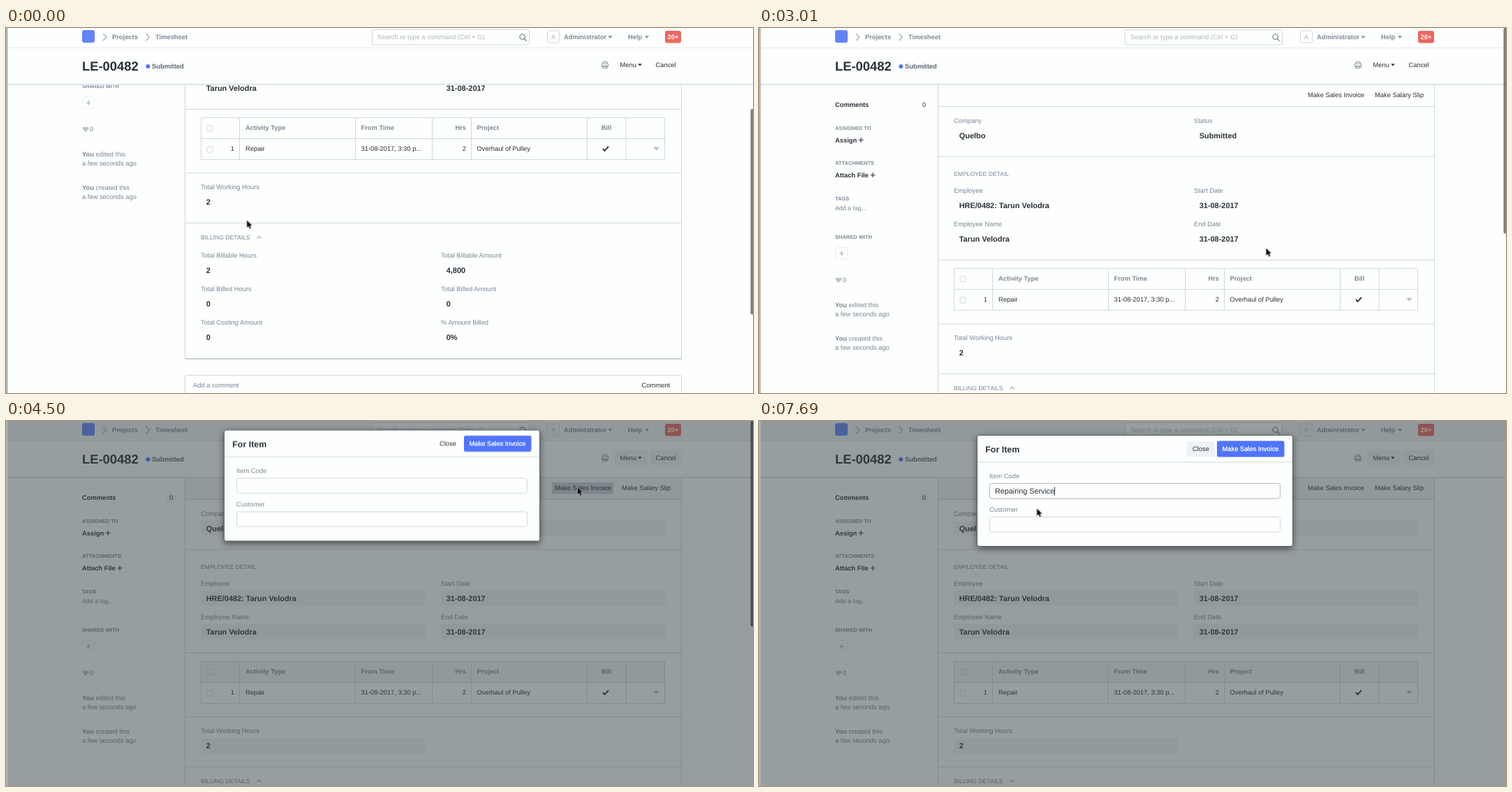
Animation, 1070 px wide and 523 px high, one loop 7990 ms. Source, as an HTML page:

```html
<!DOCTYPE html>
<html lang="en">
<head>
<meta charset="utf-8">
<title>Timesheet to invoice</title>
<style>
html, body { margin: 0; width: 100%; height: 100%; overflow: hidden; background: #fdfefe; }
svg { display: block; width: 1070px; height: 523px; }
text { font: 9.35px "Liberation Sans", Arial, sans-serif; fill: #2b3038; text-rendering: geometricPrecision; white-space: pre; }
.b { font-weight: 700; }
.g { fill: #7b8692; }
.nav { font-weight: 700; fill: #7f8994; }
.pale { fill: #b0b6bd; }
.val { font-size: 10.95px; font-weight: 700; }
.cap { font-size: 8.6px; fill: #7b8692; }
.side { font-size: 7.5px; font-weight: 700; fill: #7f8994; }
.tag { font-size: 8.8px; fill: #7b8692; }
.id { font-size: 18.4px; font-weight: 700; }
.head { font-size: 12.4px; font-weight: 700; }
.typed { font-size: 10.8px; }
.sub { font-size: 7.95px; }
.w { fill: #fff; }
.strong { stroke: #fff; stroke-width: .3; }
.end { text-anchor: end; }
.mid { text-anchor: middle; }
.paper { fill: #fdfefe; }
.fill { fill: #f2f4f8; }
.patch { fill: #f5f5fa; }
.line { fill: none; stroke: #d1d8dd; }
.dash { fill: none; stroke: #dfe4e8; stroke-dasharray: 2 1.5; }
.ink { fill: none; stroke: #2b3038; stroke-width: 1.1; }
.soft { fill: none; stroke: #a0a9b2; stroke-width: 1.1; }
.field { fill: #fdfefe; stroke: #d1d8dd; }
.drop { fill: #fdfefe; filter: drop-shadow(0 2px 3px rgba(0,0,0,.35)); }
.box { fill: #fdfefe; stroke: #5d6568; filter: drop-shadow(0 3px 5px rgba(0,0,0,.5)); }
</style>
</head>
<body>
<script>
const LOOP = 7990;
let css = '', count = 0;

const T = (x, y, s, c = '') => `<text x="${x}" y="${y}" class="${c}">${s}</text>`;
const R = (x, y, w, h, c, r = 0, extra = '') =>
  `<rect x="${x}" y="${y}" width="${w}" height="${h}" rx="${r}" class="${c}" ${extra}/>`;
const P = (d, c, extra = '') => `<path d="${d}" class="${c}" ${extra}/>`;
const G = (id, ...kids) => `<g id="${id}">${kids.join('')}</g>`;
const caret = (x, y, color, w = 3.3) => P(`M${x - w} ${y - 1.8}h${2 * w}l${-w} ${w + .4}z`, '', `fill="${color}"`);
const plus = (x, y, s, c) => P(`M${x - s} ${y}h${2 * s}M${x} ${y - s}v${2 * s}`, c);
const field = (x, y, label, value) =>
  R(x, y + 7.5, 321.5, 21.5, 'fill', 2) + T(x, y, label, 'g') + T(x + 7.7, y + 22.2, value, 'val');

// stops: [ms, declarations]
function anim(sel, ease, stops) {
  const name = 'k' + count++;
  const body = stops.map(([ms, d]) => `${(ms / LOOP * 100).toFixed(3)}%{${d}}`).join('');
  css += `@keyframes ${name}{${body}}${sel}{animation:${name} ${LOOP}ms ${ease} infinite}`;
}
function show(sel, from, to = LOOP) {
  const stops = [[0, `opacity:${from > 0 ? 0 : 1}`], [to, `opacity:${to < LOOP ? 0 : 1}`]];
  if (from > 0) stops.splice(1, 0, [from, 'opacity:1']);
  anim(sel, 'step-end', stops);
}
const at = (x, y) => `transform:translate(${x}px,${y}px)`;
const smooth = ';animation-timing-function:ease-in-out';

const sidebar =
  R(229, 102, 15, 16, 'fill', 8) + T(109, 113.3, 'Comments', 'b') + T(234, 113.3, '0') +
  T(109, 146, 'ASSIGNED TO', 'side') + T(109, 163.7, 'Assign', 'b') + plus(146, 160.5, 3.5, 'ink') +
  T(109, 196.4, 'ATTACHMENTS', 'side') + T(109, 213.9, 'Attach File', 'b') + plus(163, 210.8, 3.5, 'ink') +
  T(109, 246.7, 'TAGS', 'side') + T(109, 261.3, 'Add a tag...', 'tag') +
  T(109, 302.4, 'SHARED WITH', 'side') + R(109.5, 314.5, 17, 17, 'dash', 2) + plus(118.2, 323, 3.4, 'soft') +
  P('M114 365.3l-4-4.2c-1.6-3.4 2.6-5 4-2 1.4-3 5.6-1.4 4 2z', '', 'fill="#bfc4c9"') + T(120, 364.4, '0', 'g') +
  ['edited', 'created'].map((verb, i) =>
    T(109, 399.7 + 48 * i, `<tspan font-weight="700">You</tspan> ${verb} this`, 'g') +
    T(109, 412.6 + 48 * i, 'a few seconds ago', 'g')).join('');

const table =
  R(279.5, 344.5, 664, 30, 'fill') +
  P('M279.5 344.5h664v60h-664zM279.5 374.5h664' +
    [334.5, 500.5, 610.5, 666.5, 832.5, 888].map(x => `M${x} 344.5v60`).join(''), 'line') +
  [355.5, 386].map(y => R(288, y, 8, 8, 'line', 1)).join('') +
  T(343, 362.3, 'Activity Type', 'nav') + T(508.5, 362.3, 'From Time', 'nav') +
  T(659, 362.3, 'Hrs', 'nav end') + T(674.5, 362.3, 'Project', 'nav') + T(860, 362.3, 'Bill', 'nav mid') +
  T(327, 392.3, '1', 'end') + T(343, 392.3, 'Repair') + T(508.5, 392.3, '31-08-2017, 3:30 p...') +
  T(659, 392.3, '2', 'end') + T(674.5, 392.3, 'Overhaul of Pulley') +
  P('M855 389l2.6 2.8 5.4-6', 'ink', 'style="stroke-width:1.9"') + caret(931.5, 388.6, '#b8bfc5', 4.4);

const form =
  R(257, 81, 710, 31.5, 'fill') +
  R(781.5, 88, 88.5, 16.5, '', 2.5, 'id="hover" fill="#c6ccd3"') +
  T(786, 99.4, 'Make Sales Invoice') + T(882, 99.4, 'Make Salary Slip') +
  field(279, 135.5, 'Company', 'Quelbo') + field(623, 135.5, 'Status', 'Submitted') +
  T(279, 211.7, 'EMPLOYEE DETAIL', 'cap') +
  field(279, 235.6, 'Employee', 'HRE/0482: Tarun Velodra') + field(623, 235.6, 'Start Date', '31-08-2017') +
  field(279, 283.6, 'Employee Name', 'Tarun Velodra') + field(623, 283.6, 'End Date', '31-08-2017') +
  table +
  field(279, 447.2, 'Total Working Hours', '2') +
  T(279, 518.8, 'BILLING DETAILS', 'cap') + P('M359.5 517.5l3.2-3.2 3.2 3.2', 'soft') +
  field(279, 544.8, 'Total Billable Hours', '2') + field(623, 544.8, 'Total Billable Amount', '4,800') +
  field(279, 592.9, 'Total Billed Hours', '0') + field(623, 592.9, 'Total Billed Amount', '0') +
  field(279, 641, 'Total Costing Amount', '0') + field(623, 641, '% Amount Billed', '0%') +
  P('M256.5 70V690M967.5 70V690' + [112.5, 184, 332.5, 424, 495.5].map(y => `M256.5 ${y}h711`).join(''), 'line') +
  P('M256.5 690h711', 'line', 'style="stroke:#b9c0c8;stroke-width:1.4"') +
  R(256.5, 713.5, 711, 60, 'line', 2) + T(268, 730.8, 'Add a comment', 'g') + T(951, 730.8, 'Comment', 'end');

const patches =
  R(279, 552, 70, 21.5, 'patch', 0, 'id="p1"') +
  G('p2', R(349, 558, 133, 15.5, 'patch'), R(482, 552, 119, 21.5, 'patch')) +
  R(623, 552, 42, 19.5, 'patch', 0, 'id="p3"');

const header =
  R(0, -5, 1070, 85.5, 'paper') + R(0, -5, 1070, 33, 'fill') +
  P('M0 28.5h1070', 'line', 'style="stroke:#e6eaed"') + P('M0 80.5h1070', 'line') +
  P('M0 81.5h1070', 'line', 'style="stroke:#eceff1"') +
  R(109, 3, 18, 18, '', 3, 'fill="#6383fb"') +
  [139, 200.5].map(x => P(`M${x} 8l5 5-5 5`, 'soft')).join('') +
  T(152, 16.4, 'Projects', 'nav') + T(214, 16.4, 'Timesheet', 'nav') +
  R(524.5, 2.5, 225, 21.5, 'field', 2.5) + T(532, 16.4, 'Search or type a command (Ctrl + G)', 'pale') +
  P('M736 12.5a3.7 3.7 0 1 1 7.4 0a3.7 3.7 0 1 1-7.4 0M742.4 15.3l3.2 3.2', 'ink', 'style="stroke:#66707a"') +
  R(775.5, 4, 17, 17, 'line', 2) + T(784, 16.4, 'A', 'pale mid') +
  T(799, 16.2, 'Administrator', 'nav') + caret(865.5, 13, '#8d99a6') +
  T(891, 16.2, 'Help', 'nav') + caret(918, 13, '#8d99a6') +
  R(944, 4, 23, 17.5, '', 3, 'fill="#ee6660"') + T(955.5, 16.2, '20+', 'w b mid') +
  T(109, 61, 'LE-00482', 'id') + '<circle cx="203.3" cy="55" r="3" fill="#4f74ff"/>' +
  T(209, 58.3, 'Submitted', 'b" style="fill:#5d6670') +
  P('M855 51v-2.5h6V51M853.5 51h9v4.5h-9zM855 54h6v3.5h-6z', 'ink', 'style="stroke:#848d96;stroke-width:.9"') +
  R(871.5, 42, 47.5, 21.5, 'fill', 2.5) + T(879.5, 56, 'Menu') + caret(908, 53, '#2b3038', 2.8) +
  R(922.5, 42, 45, 21.5, 'fill', 2.5) + T(930.5, 56, 'Cancel');

const row = (i, name, sub) => T(339.3, 131 + 36.1 * i, name, 'b') + T(339.3, 140 + 36.1 * i, sub, 'sub');

const lists =
  G('all', R(330, 113, 417, 151, 'drop', 2), R(330.5, 114, 416, 36, '', 0, 'fill="#eff2f5"'),
    row(0, 'Gelk-prime-rd4170', 'Gelk Prime R, Gelk R, Products'),
    row(1, 'Test Item Serial No', 'Products'),
    row(2, 'Norvi Tablet 5 (Ash Grey, 256GB)', 'Tablet 5, Products'),
    row(3, 'Phone Charger', 'Products')) +
  G('match', R(330, 113, 417, 94, 'drop', 2), R(330.5, 114, 416, 36, '', 0, 'fill="#eff2f5"'),
    row(0, 'Repairing Service', 'Services'),
    T(339.3, 168, 'Create a new Item'), T(339.3, 195, 'Advanced Search'));

const modal =
  R(312.5, 20.5, 452, 159, 'box', 3) + P('M313 59h451', 'line') +
  T(324.3, 45, 'For Item', 'head') +
  R(613, 29, 40, 22, '', 2.5, 'id="close" fill="#eff2f5"') + T(633, 43, 'Close', 'mid') +
  R(656, 28.5, 96.5, 23, '', 2.5, 'fill="#5074fd"') + T(704, 43, 'Make Sales Invoice', 'w mid strong') +
  T(330, 82.2, 'Item Code', 'g') + R(330.5, 89.5, 416, 21.5, 'field', 3) +
  R(330.5, 89.5, 416, 21.5, 'field', 3, 'id="focus" style="stroke:#b8bbbe"') +
  T(330, 130.2, 'Customer', 'g') + R(330.5, 137.5, 416, 21.5, 'field', 3) +
  ['r', 're', 'rep'].map((s, i) => G('t' + i, T(338, 104.4, s, 'typed'))).join('') +
  G('done', T(338, 104.4, 'Repairing Service', 'typed'), P('M423.5 94.5v12', 'ink', 'style="stroke-width:1"')) +
  lists;

const arrow = P('M0 0V12.2L2.8 9.6 4.7 14 6.9 13 5 8.8H8.8Z', '',
  'transform="scale(.86)" fill="#111" stroke="#fff" stroke-width="1" paint-order="stroke"');

// Page scroll, then the overscroll settling back
const scroll = (sel, y) => anim(sel, 'linear', [
  [0, at(0, y)], [2410, at(0, y) + smooth], [3010, at(0, 0)], [7989, at(0, 0)], [LOOP, at(0, y)]]);
scroll('#page', -216);
scroll('#thumb', 116);
anim('#view', 'linear', [
  [0, at(0, 0)], [3010, at(0, 0)], [3160, at(0, 4)], [3340, at(0, 2.3)],
  [3580, at(0, 2.3)], [3730, at(0, 0)], [LOOP, at(0, 0)]]);

anim('#cursor', 'linear', [
  [0, at(345, 275.5)], [150, at(345, 275.5)], [450, at(312, 312)], [750, at(270, 356)],
  [1070, at(285, 350)], [1220, at(285, 350)], [1520, at(440, 334)], [1820, at(653, 347)],
  [1960, at(653, 347)], [2260, at(619, 339.5)], [2410, at(619, 339.5)], [3160, at(753, 309.5)],
  [3580, at(753, 309.5) + smooth], [4060, at(818.6, 95)],
  [5030, at(818.6, 95) + smooth], [5550, at(429, 86)],
  [7100, at(429, 86) + smooth], [7400, at(398, 125.3)],
  [7989, at(398, 125.3)], [LOOP, at(345, 275.5)]]);

show('#p1', 920, 2410);
show('#p2', 1520, 2410);
show('#p3', 1820, 2410);
show('#bar', 0, 4710);
show('#hover', 4060, 4710);
show('.fill', 4350);
anim('#dim', 'step-end', [[0, 'opacity:0'], [4350, 'opacity:.04'], [4500, 'opacity:.5'], [LOOP, 'opacity:.5']]);
anim('#modal', 'step-end', [
  [0, 'opacity:0;' + at(0, -34)], [4350, 'opacity:.07;' + at(0, -34)],
  [4500, 'opacity:1;' + at(0, -7.5)], [4710, 'opacity:1;' + at(0, 0)], [LOOP, 'opacity:1;' + at(0, 0)]]);
show('#close', 4710);
show('#focus', 5470);
show('#all', 5620, 6800);
show('#match', 6800, 7400);
show('#t0', 6360, 6510);
show('#t1', 6510, 6800);
show('#t2', 6800, 7400);
show('#done', 7400);

document.head.insertAdjacentHTML('beforeend', `<style>${css}</style>`);
document.body.innerHTML = '<svg viewBox="0 0 1070 523">' +
  R(0, 0, 1070, 523, 'paper') +
  G('view', G('page', patches, sidebar, form), header) +
  R(0, 0, 1070, 523, '', 0, 'id="dim" fill="#334143"') +
  R(0, 0, 2.5, 523, '', 0, 'fill="#b2b3b5"') +
  G('bar', R(1066.5, 0, 5, 294.5, '', 2, 'id="thumb" fill="#000" fill-opacity=".5"')) +
  G('modal', modal) + G('cursor', arrow) + '</svg>';
</script>
</body>
</html>
```
